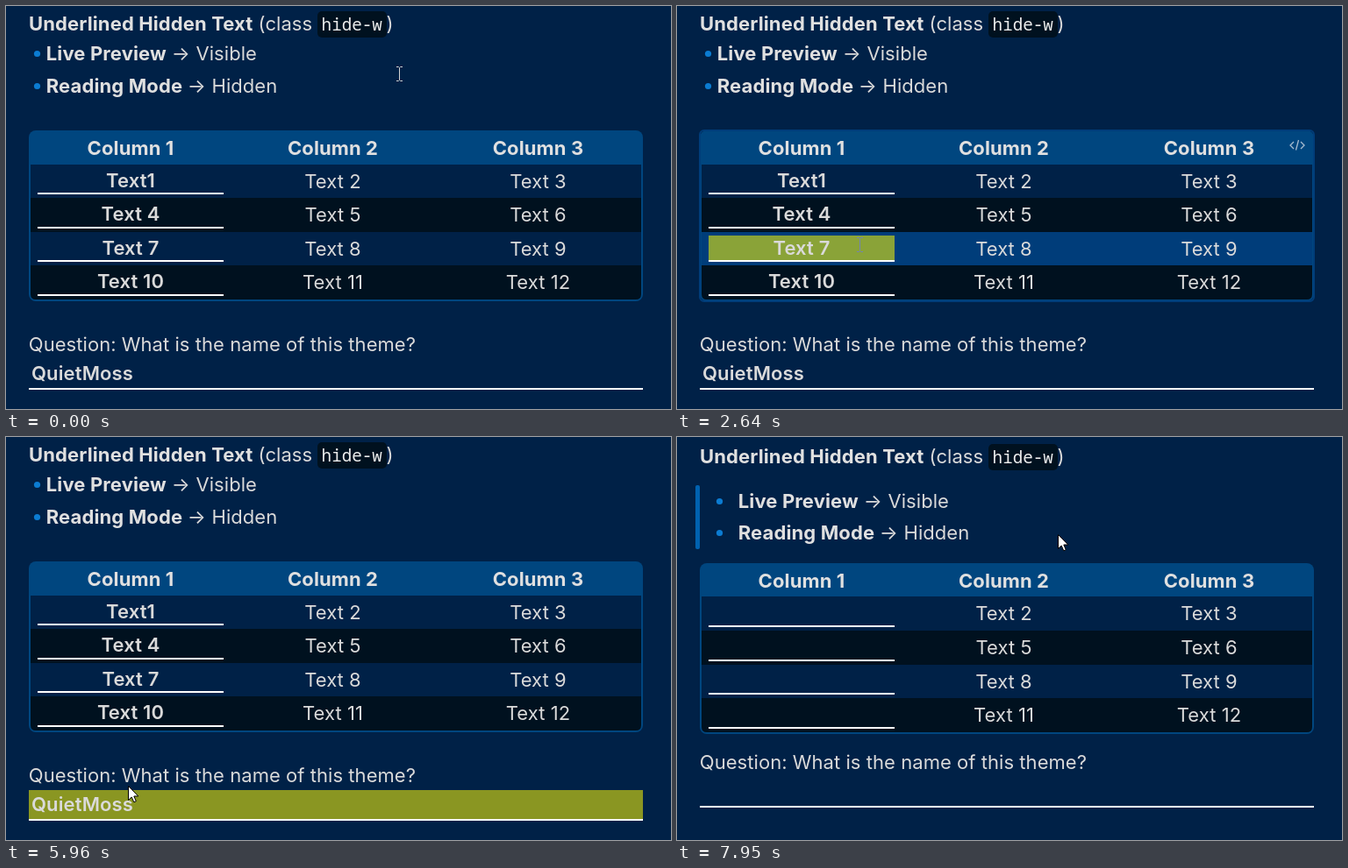
Recreate the animation shown at these times as an HTML page. Size 758x460 px, loop 8000 ms.

```html
<!DOCTYPE html>
<html lang="en">
<head>
<meta charset="utf-8">
<title>Hidden text demo</title>
<style>
  html, body { margin: 0; width: 100%; height: 100%; overflow: hidden; background: #002147; }
  svg { display: block; width: 758px; height: 460px; }
  text {
    font: 400 22px Inter, sans-serif; font-optical-sizing: none;
    letter-spacing: 0.05px; fill: #dadada; white-space: pre;
  }
  .bold { font-weight: 700; letter-spacing: 0.12px; fill: #e0e0e0; }
  .semi { font-weight: 600; letter-spacing: 0.12px; }
  .mid { text-anchor: middle; }
  .code { font: 500 19.25px "Noto Sans Mono", "DejaVu Sans Mono", monospace; letter-spacing: 0; fill: #ececec; }
</style>
</head>
<body>
<svg id="stage" viewBox="0 0 758 460" xmlns="http://www.w3.org/2000/svg"></svg>
<script>
const LOOP = 8000;
const NAVY = '#002147', DARK = '#00111f', HEAD = '#00467f', HOVER = '#003d7a';
const CELL = '#8aa338', ANSWER = '#8a9622', GLOW = '#069cff';
const COLS = [142, 372.5, 606.5];
const stage = document.getElementById('stage');

// Each step: start time, then what differs from the resting page.
// row: hovered row, cell: first cell is lit, beam / arrow: pointer position, over: pointer lies on green
const STEPS = [
  [0,    { beam: [448.5, 77.5] }],
  [330,  { beam: [370.5, 125.5] }],
  [660,  { row: 0, beam: [249.5, 201.5] }],
  [990,  { row: 0, cell: true, beam: [232.5, 202.5], over: true }],
  [1650, { row: 0, beam: [220.5, 222.5] }],
  [1980, { row: 1, cell: true, beam: [212.5, 241.5], over: true }],
  [2640, { row: 2, cell: true, beam: [208.5, 272.5], over: true }],
  [2970, { row: 2, cell: true }],
  [3300, { row: 3, beam: [203.5, 304.5] }],
  [3630, { row: 3, cell: true, beam: [197.5, 323.5], over: true }],
  [4630, { beam: [150.5, 380.5] }],
  [4960, { answer: true, beam: [129.5, 428.5], over: true }],
  [5960, { answer: true, arrow: [139.5, 398.5] }],
  [6290, { reading: true }],
  [6620, { reading: true, glow: 0.5, arrow: [434.5, 111.5] }],
  [6950, { reading: true, glow: 1, click: true, arrow: [434.5, 111.5] }],
  [7950, { reading: true, arrow: [434.5, 111.5] }]
];

const rect = (x, y, w, h, fill, more = '') =>
  `<rect x="${x}" y="${y}" width="${w}" height="${h}" fill="${fill}" ${more}/>`;
const text = (x, y, str, cls = '') => `<text x="${x}" y="${y}" class="${cls}">${str}</text>`;

function title(s) {
  const y = s.reading ? 30 : 28;
  return text(26, y, 'Underlined Hidden Text', 'bold') +
    text(287.6, y, '(class') +
    rect(355, y - 22, 79, 30, DARK, 'rx="5"') +
    text(359.6, y, 'hide-w', 'code') +
    text(433.5, y, ')');
}

function callout(s) {
  if (!s.reading) return '';
  const g = s.glow || 0;
  let out = '';
  if (g < 1) out += rect(21, 55, 5, 73, '#0062b0', `rx="2" opacity="${1 - g}"`);
  if (!g) return out;
  const ring = 3 * g;
  const frame = more => rect(26 - ring / 2, 55 - ring / 2, 700 + ring, 73 + ring, 'none',
    `rx="4" stroke="${GLOW}" ${more}`);
  return out +
    `<filter id="soft" filterUnits="userSpaceOnUse" x="0" y="20" width="758" height="150">
      <feGaussianBlur stdDeviation="${4.5 * g}"/></filter>` +
    frame(`stroke-width="${9 * g}" filter="url(#soft)" opacity="${0.4 + 0.5 * g}"`) +
    rect(26, 55, 700, 73, NAVY, 'rx="3"') +
    frame(`stroke-width="${ring}" opacity="${0.4 + 0.6 * g}"`);
}

function list(s) {
  const dx = s.reading ? 24 : 0;
  const item = (y, name, arrowX, value) =>
    `<circle cx="${dx ? 48.5 : 35.5}" cy="${y - 7.5}" r="3.6" fill="${s.glow ? '#0592f4' : '#0b7cd2'}"/>` +
    text(45.8 + dx, y, name, 'bold') +
    text(arrowX + dx, y, '→', 'mid') +
    text(arrowX + 17.3 + dx, y, value);
  const [a, b] = s.reading ? [81, 117] : [62, 99];
  return item(a, 'Live Preview', 199.2, 'Visible') + item(b, 'Reading Mode', 217.2, 'Hidden');
}

function table(s) {
  const top = s.reading ? 144 : 142;
  const rowTop = i => Math.round(s.reading ? 182.4 + 38.6 * i : 181 + 38.4 * i);
  const lineTop = i => Math.round(s.reading ? 215 + 38.6 * i : 213 + 38.5 * i);
  const hovered = s.row !== undefined;
  let out = `<clipPath id="round">${rect(26, top, 700, 195, '#000', 'rx="8"')}</clipPath>` +
    `<g clip-path="url(#round)">` + rect(26, top, 700, 195, HEAD);
  for (let i = 0; i < 4; i++) {
    const fill = s.row === i ? HOVER : i % 2 ? DARK : NAVY;
    const y = rowTop(i), h = rowTop(i + 1) - y;
    // The last row gets rounded lower corners.
    out += i < 3 ? rect(28, y, 696, h, fill)
      : `<path d="M28 ${y}H724v${h - 6}q0 6-6 6H34q-6 0-6-6z" fill="${fill}"/>`;
  }
  out += '</g>';
  COLS.forEach((x, c) => out += text(x, top + 28, `Column ${c + 1}`, 'bold mid'));
  for (let i = 0; i < 4; i++) {
    const y = rowTop(i), line = lineTop(i);
    if (s.row === i && s.cell) out += rect(36, y + 4, 212, line - y - 4, CELL);
    out += rect(36, line, 212, 2, '#fff');
    COLS.forEach((x, c) => {
      const label = `Text${i + c ? ' ' : ''}${3 * i + c + 1}`;
      if (c) out += text(x, y + 27, label, 'mid');
      else if (!s.reading) out += text(x, y + 26, label, 'semi mid');
    });
  }
  if (hovered) {
    out += rect(26, 142, 700, 195, 'none', `rx="5" stroke="${HOVER}" stroke-width="2"`) +
      `<path d="M703 155L699 159 703 163M711 155L715 159 711 163M708.5 153L705.5 164.5"
        fill="none" stroke="#a6bbd0" stroke-width="1.3"/>`;
  }
  return out;
}

function question(s) {
  const y = s.reading ? 379 : 394;
  return text(25.8, y, 'Question: What is the name of this theme?') +
    (s.answer ? rect(26, 403, 700, 34, ANSWER) : '') +
    rect(26, y + 42, 700, 2, '#fff') +
    (s.reading ? '' : text(29, 427, 'QuietMoss', 'semi'));
}

function pointer(s) {
  let out = s.click ? '<circle cx="433.5" cy="110.5" r="12.3" fill="#7f8428"/>' : '';
  if (s.beam) {
    out += `<path transform="translate(${s.beam})" fill="none" stroke="${s.over ? '#7283b4' : '#d4d4d4'}"
      d="M-3.5-8H-1L0-7 1-8H3.5M0-7V7M-3.5 8H-1L0 7 1 8H3.5"/>`;
  }
  if (s.arrow) {
    out += `<path transform="translate(${s.arrow})" fill="#fff" stroke="#000"
      d="M0 0V16L3.7 12.5 6.3 18.3 8.8 17.2 6.3 11.5H11.3Z"/>`;
  }
  return out;
}

let shown = null;
function draw(time) {
  const t = time % LOOP;
  const state = STEPS.filter(step => step[0] <= t).pop()[1];
  if (state !== shown) {
    shown = state;
    stage.innerHTML = rect(0, 0, 758, 460, NAVY) +
      [callout, title, list, table, question, pointer].map(part => part(state)).join('');
  }
}

const start = performance.now();
function tick() {
  draw(performance.now() - start);
  requestAnimationFrame(tick);
}
tick();
</script>
</body>
</html>
```
